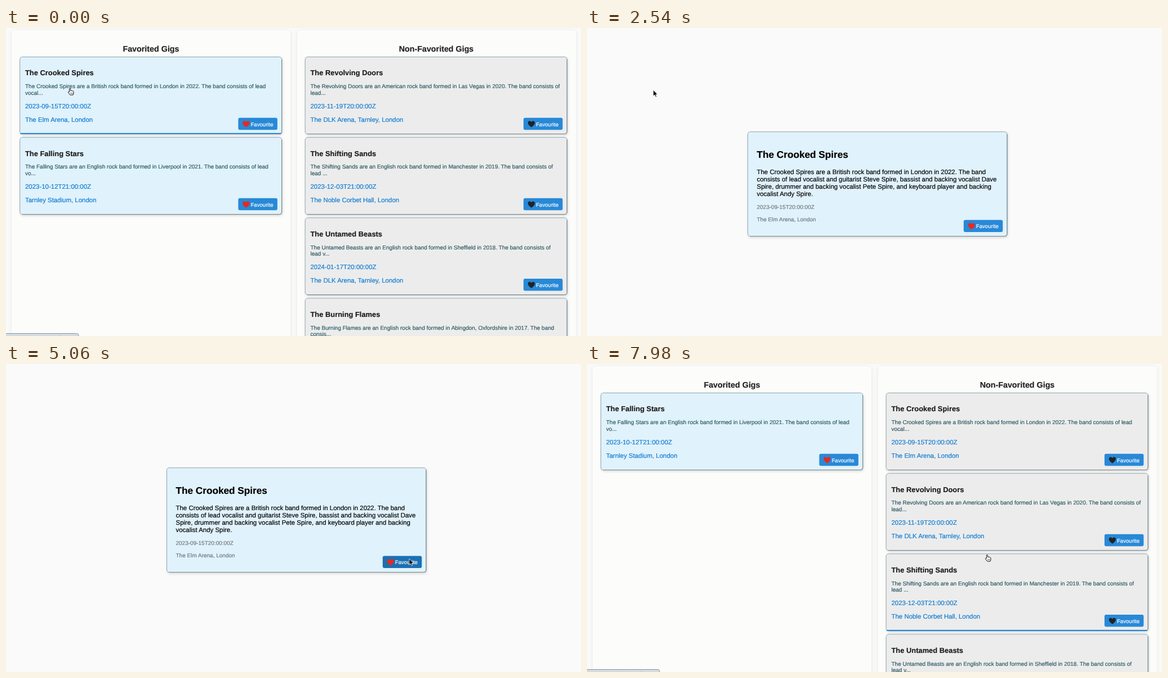
Write an HTML page that moves like this. It is 1021x548 px and loops after 8 s.

```html
<!DOCTYPE html>
<html lang="en">
<head>
<meta charset="utf-8">
<title>Gigs</title>
<style>
html, body { margin: 0; width: 100%; height: 100%; overflow: hidden; background: #fafafa; }
svg { display: block; font: 11.44px "Liberation Sans", Arial, sans-serif; text-rendering: geometricPrecision; }
text { fill: currentColor; stroke: currentColor; stroke-width: .18; }
.column { fill: #fcfcfb; filter: drop-shadow(0 1px 3px rgba(0, 0, 0, .08)); }
.panel { stroke: #93a7ae; filter: drop-shadow(1px 2px 2px rgba(0, 0, 0, .15)); }
.edge { fill: none; stroke: #71858f; }
.heading { font-size: 14.3px; font-weight: bold; color: #222; text-anchor: middle; }
.name { font-size: 12.9px; font-weight: bold; color: #1d1d1d; }
.blurb { font-size: 10px; color: #2c5861; }
.info { color: #0f7bd2; }
.title { font-size: 17.2px; font-weight: bold; }
.small { font-size: 10px; color: #70777b; }
.label { font-size: 9.65px; color: #fff; }
</style>
</head>
<body>
<svg id="stage" width="1021" height="548" viewBox="0 0 1021 548"></svg>
<script>
const BLUE = '#e0f2fb', GREY = '#ececec', BUTTON = '#2889d7', BUTTON_HOVER = '#1b70b3';
const RED = '#e6291f', BLACK = '#202427';

const gig = (name, blurb, date, venue) => ({ name, blurb, date: date + ':00:00Z', venue });
const spires = gig('The Crooked Spires',
  ['are a British rock band formed in London in 2022. The band consists of lead', 'vocal...'],
  '2023-09-15T20', 'The Elm Arena, London');
const stars = gig('The Falling Stars',
  ['are an English rock band formed in Liverpool in 2021. The band consists of lead', 'vo...'],
  '2023-10-12T21', 'Tarnley Stadium, London');
const doors = gig('The Revolving Doors',
  ['are an American rock band formed in Las Vegas in 2020. The band consists of', 'lead...'],
  '2023-11-19T20', 'The DLK Arena, Tarnley, London');
const sands = gig('The Shifting Sands',
  ['are an English rock band formed in Manchester in 2019. The band consists of', 'lead ...'],
  '2023-12-03T21', 'The Noble Corbet Hall, London');
const beasts = gig('The Untamed Beasts',
  ['are an English rock band formed in Sheffield in 2018. The band consists of', 'lead v...'],
  '2024-01-17T20', 'The DLK Arena, Tarnley, London');
const flames = gig('The Burning Flames',
  ['are an English rock band formed in Abingdon, Oxfordshire in 2017. The band', 'consis...'],
  '2024-02-21T20', 'The Elm Arena, London');

const text = (x, y, cls, str) => `<text x="${x}" y="${y}" class="${cls}">${str}</text>`;

const panel = (x, y, w, h, fill) =>
  `<rect class="panel" x="${x}" y="${y}" width="${w}" height="${h}" rx="4.5" fill="${fill}"/>
   <path class="edge" d="M${x + w} ${y + 4}v${h - 8}q0 4-4 4h${8 - w}"/>`;

const button = (x, y, heart, id = '') =>
  `<g transform="translate(${x} ${y})"${id && ` id="${id}"`}>
     <rect width="69.5" height="21.5" rx="3" fill="${BUTTON}"/>
     <path fill="${heart}" d="M14 17C10 13.8 7.8 11.6 7.8 9.1C7.8 5.3 12.3 4.7 14 7.8C15.7 4.7 20.2 5.3 20.2 9.1C20.2 11.6 18 13.8 14 17Z"/>
     ${text(22, 14.9, 'label', 'Favourite')}
   </g>`;

function card(x, y, favourite, { name, blurb, date, venue }) {
  const left = x + 9.3;
  return panel(x, y, 465, 137, favourite ? BLUE : GREY) +
    text(left, y + 32.9, 'name', name) +
    text(left, y + 55.8, 'blurb', name + ' ' + blurb[0]) +
    text(left, y + 67.2, 'blurb', blurb[1]) +
    text(left, y + 91.1, 'info', date) +
    text(left, y + 115.3, 'info', venue) +
    button(x + 387.7, y + 108.2, favourite ? RED : BLACK);
}

const columns = height => [10, 517].map(x =>
  `<rect class="column" x="${x}" y="4" width="495" height="${height}" rx="4"/>`).join('') +
  text(257.5, 41.6, 'heading', 'Favorited Gigs') +
  text(764, 41.6, 'heading', 'Non-Favorited Gigs');

const list = (favourites, others) => columns(600) +
  favourites.map((g, i) => card(24.7, 51.5 + 143.1 * i, true, g)).join('') +
  others.map((g, i) => card(531.2, 51.5 + 143.1 * i, false, g)).join('');

const detail = panel(285.5, 184.7, 460.5, 185.8, BLUE) +
  text(301.5, 231.3, 'title', spires.name) +
  ['The Crooked Spires are a British rock band formed in London in 2022. The band',
   'consists of lead vocalist and guitarist Steve Spire, bassist and backing vocalist Dave',
   'Spire, drummer and backing vocalist Pete Spire, and keyboard player and backing',
   'vocalist Andy Spire.'].map((line, i) => text(301.5, 259.7 + 13 * i, '', line)).join('') +
  text(301.5, 322, 'small', spires.date) +
  text(301.5, 343.6, 'small', spires.venue) +
  button(668.8, 341.4, RED, 'toggle');

const scenes = {
  before: list([spires, stars], [doors, sands, beasts, flames]),
  loading: panel(475, 244.6, 81.3, 66.4, BLUE) + text(490.8, 282, '', 'Loading...'),
  detail,
  empty: columns(62),
  after: list([stars], [spires, doors, sands, beasts]),
};

const $ = id => document.getElementById(id);
$('stage').innerHTML =
  Object.entries(scenes).map(([id, body]) => `<g id="${id}">${body}</g>`).join('') +
  `<rect id="underline" height="2" fill="#2488dc"/>
   <g id="status">
     <path d="M-1 543.5H125.5Q129 543.5 129 547V550H-1Z" fill="#d3dce1" stroke="#8d979d"/>
     ${text(1, 554.5, 'small', 'Opening the gig details page')}
   </g>
   <path id="arrow" d="M0 0V10.8L2.5 8.6 4.2 12.4 6 11.6 4.3 8H7.6Z" stroke="#fff" stroke-width=".8"/>
   <g id="hand" fill="#fff" stroke="#111" stroke-linejoin="round">
     <path d="M-.5 7.4V1.4Q.5 0 1.5 1.4V4.7L5.7 5.4Q7.1 5.8 7 7.2V9.4L6 12.6H.9L-2.5 8.3Q-2.7 6.5-1.5 6.9Z"/>
     <path d="M1.7 8.4V10.8M3.4 8.4V10.8M5.1 8.4V10.8" stroke-width=".6"/>
   </g>`;

const schedule = [[0, 'before'], [300, 'loading'], [780, 'detail'], [6560, 'empty'], [6840, 'after']];

// time, x, y of the pointer tip
const route = [
  [0, 113, 106.5], [2500, 113, 106.5], [2540, 117, 110], [2700, 230, 160], [3000, 640, 325],
  [3240, 795, 374], [3500, 796, 375], [3940, 786, 371.5], [4080, 744, 366], [4180, 742, 365],
  [4700, 716, 346.5], [7450, 716, 346.5], [7850, 710, 338.5], [8000, 710, 338.5],
];

const progress = (t, from, to) => Math.min(1, Math.max(0, (t - from) / (to - from)));

function pointer(t) {
  const i = route.findIndex(p => p[0] > t);
  const [t0, x0, y0] = route[i - 1], [t1, x1, y1] = route[i];
  const k = progress(t, t0, t1);
  return [x0 + (x1 - x0) * k, y0 + (y1 - y0) * k];
}

// CSS "ease" timing curve, solved by bisection
function ease(x) {
  const bezier = (a, b, u) => 3 * a * u * (1 - u) ** 2 + 3 * b * u * u * (1 - u) + u ** 3;
  let lo = 0, hi = 1;
  for (let i = 0; i < 20; i++) {
    const mid = (lo + hi) / 2;
    if (bezier(.25, .25, mid) < x) lo = mid; else hi = mid;
  }
  return bezier(.1, 1, lo);
}

const show = (id, on) => $(id).setAttribute('visibility', on ? 'visible' : 'hidden');

function render(t) {
  const scene = schedule.filter(([start]) => start <= t).pop()[1];
  for (const id in scenes) $(id).style.display = id === scene ? '' : 'none';

  const [x, y] = pointer(t);
  const onCard = scene === 'before' || scene === 'after';
  for (const id of ['arrow', 'hand']) $(id).setAttribute('transform', `translate(${x} ${y})`);
  show('hand', onCard);
  show('arrow', !onCard);

  const [fill, heart] = $('toggle').children;
  const hovered = x > 669 && x < 738 && y > 341 && y < 363;
  fill.setAttribute('fill', hovered ? BUTTON_HOVER : BUTTON);
  heart.setAttribute('fill', t < 5300 ? RED : BLACK);

  const line = $('underline'), first = scene === 'before';
  line.setAttribute('x', first ? 25.5 : 532);
  line.setAttribute('y', first ? 186.8 : 473);
  line.setAttribute('width', 463 * (first ? 1 : ease(progress(t, 6852, 7152))));
  show('underline', onCard);

  const status = t < 4000 ? 1 - progress(t, 1500, 1800) : progress(t, 7680, 7850);
  $('status').setAttribute('opacity', status);
}

function tick() {
  render(performance.now() % 8000);
  requestAnimationFrame(tick);
}
tick();
</script>
</body>
</html>
```
